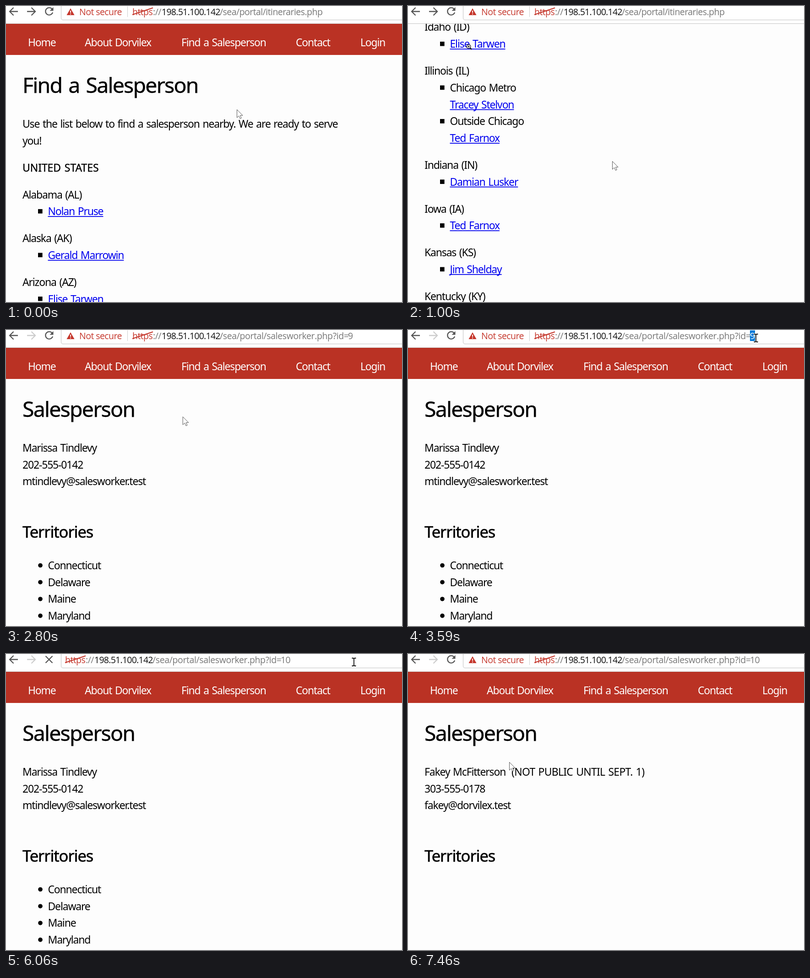
Recreate the animation shown at these times as an HTML page. Size 865 by 647 pixels, loop 8 s.

```html
<!DOCTYPE html>
<html lang="en">
<head>
<meta charset="utf-8">
<style>
html, body { margin: 0; width: 100%; height: 100%; overflow: hidden; background: #fdfdfd; }
svg { display: block; width: 865px; height: 647px; }
text { font: 22.9px "Noto Sans", "Open Sans", sans-serif; letter-spacing: -.049em; word-spacing: .08em; white-space: pre; }
.nav { fill: #fff; }
.link { fill: #00e; }
.note { letter-spacing: -.03em; }
.h1 { font-size: 46.4px; letter-spacing: -.038em; stroke: #000; stroke-width: .4px; }
.h2 { font-size: 34.4px; letter-spacing: -.03em; stroke: #000; stroke-width: .6px; }
.caps { letter-spacing: 0; stroke: #000; stroke-width: .4px; }
.bar text { font: 19.5px "Open Sans", "Noto Sans", sans-serif; letter-spacing: -.55px; word-spacing: 0; fill: #777; }
.bar .host { fill: #111; letter-spacing: -.75px; }
.bar .red { fill: #c5372c; }
.bar .sel { fill: #fff; }
.bar .wide { letter-spacing: -.38px; }
.icon { fill: none; stroke: #555; stroke-width: 2.3; }
</style>
</head>
<body>
<svg viewBox="0 0 865 647">
  <defs>
    <path id="ibeam" d="M755.5 9H758.5L760 10.5L761.5 9H764.5M760 10V25M755.5 26H758.5L760 24.5L761.5 26H764.5"/>
  </defs>
  <rect width="865" height="647" fill="#fdfdfd"/>
  <g id="list"></g>
  <g id="first"></g>
  <g id="second"></g>

  <g class="bar">
    <rect width="865" height="38" fill="#fff"/>
    <path d="M0 38.5H865" stroke="#c4c4c4"/>
    <path d="M120.5 -2V26q0 4.5 4.5 4.5H870" fill="#fff" stroke="#c2c2c2"/>
    <path class="icon" d="M26 12H8.5M16.5 3.5L8 12L16.5 20.5"/>
    <path class="icon" id="forward" d="M46 12H63.5M55.5 3.5L64 12L55.5 20.5"/>
    <g id="reload">
      <path class="icon" d="M100.5 6.5A8 8 0 1 0 102 14"/>
      <path d="M103.5 2.5V10.5H95.5Z" fill="#555"/>
    </g>
    <path class="icon" id="stop" d="M86.5 4.5L101.5 19.5M101.5 4.5L86.5 19.5"/>
    <g id="warning">
      <path d="M141 5L149.5 20H132.5Z" fill="#c5372c"/>
      <path d="M141 10V15M141 16.5V18.5" stroke="#fff" stroke-width="1.8"/>
      <text class="red" x="160" y="19.5">Not secure</text>
      <path d="M265.5 1V24" stroke="#ccc"/>
    </g>
    <g id="address">
      <text class="red" x="276" y="19.5">https</text>
      <text x="321" y="19.5">://</text>
      <path d="M276 19L321 4" stroke="#c5372c" stroke-width="2.2"/>
      <text class="host" x="340" y="19.5">198.51.100.142</text>
      <text id="path" x="467" y="19.5"></text>
      <rect id="mark" x="747" y="1" width="11" height="23" fill="#0078d7"/>
      <text id="digits" x="747" y="19.5"></text>
    </g>
  </g>

  <path id="arrow" d="M.5 .5V18L4.7 14.2L7.4 20.3L10.2 19L7.5 13.2H13Z" fill="#fff" stroke="#555"/>
  <g id="beam" fill="none">
    <use href="#ibeam" stroke="#fff" stroke-width="4"/>
    <use href="#ibeam" stroke="#111" stroke-width="1.8"/>
  </g>
  <g id="lens" stroke="#222" stroke-width="1.4">
    <path d="M3 3L6.5 6.5" stroke-width="2.5"/>
    <circle r="4.3" fill="#fff"/>
    <path d="M-2.3 0H2.3M0 -2.3V2.3"/>
  </g>
</svg>

<script>
const $ = id => document.getElementById(id);
const LINE = 36.72, GAP = 22.2, LOOP = 8000;

function add(parent, tag, attrs, text) {
  const el = document.createElementNS('http://www.w3.org/2000/svg', tag);
  for (const k in attrs) el.setAttribute(k, attrs[k]);
  if (text) el.textContent = text;
  return parent.appendChild(el);
}
const write = (g, x, y, text, cls = '') => add(g, 'text', { x, y, class: cls }, text);

function link(g, y, name) {
  const width = write(g, 91.5, y, name, 'link').getComputedTextLength();
  add(g, 'rect', { x: 91.5, y: y + 2, width, height: 1.8, fill: '#00e' });
}
const square = (g, y) => add(g, 'rect', { x: 70, y: y - 13.3, width: 9.6, height: 9.6 });

function header(g, title) {
  add(g, 'rect', { y: 39, width: 865, height: 68, fill: '#ba3224' });
  const items = { Home: 48, 'About Dorvilex': 172, 'Find a Salesperson': 383, Contact: 633, Login: 774 };
  for (const name in items) write(g, items[name], 88, name, 'nav');
  write(g, 36, 190, title, 'h1');
}

function person(g, lines, places) {
  header(g, 'Salesperson');
  lines.forEach((s, i) => write(g, 36, 266 + i * LINE, s));
  write(g, 36, 454, 'Territories', 'h2');
  places.forEach((s, i) => {
    const y = 523 + i * LINE;
    add(g, 'circle', { cx: 75, cy: y - 8.5, r: 4.8 });
    write(g, 91.5, y, s);
  });
}

// A bar in a row marks an area with its own salesperson.
const states = [
  ['Alabama (AL)', 'Nolan Pruse'],
  ['Alaska (AK)', 'Gerald Marrowin'],
  ['Arizona (AZ)', 'Elise Tarwen'],
  ['Arkansas (AR)', 'Nolan Pruse'],
  ['California (CA)', 'Northern California|Elise Tarwen', 'Southern California|Elise Tarwen'],
  ['Colorado (CO)', 'Elise Tarwen'],
  ['Connecticut (CT)', 'Marissa Tindlevy'],
  ['Delaware (DE)', 'Marissa Tindlevy'],
  ['Florida (FL)', 'Nolan Pruse'],
  ['Georgia (GA)', 'Nolan Pruse'],
  ['Hawaii (HI)', 'Elise Tarwen'],
  ['Idaho (ID)', 'Elise Tarwen'],
  ['Illinois (IL)', 'Chicago Metro|Tracey Stelvon', 'Outside Chicago|Ted Farnox'],
  ['Indiana (IN)', 'Damian Lusker'],
  ['Iowa (IA)', 'Ted Farnox'],
  ['Kansas (KS)', 'Jim Shelday'],
  ['Kentucky (KY)', 'Damian Lusker']
];

const list = $('list');
header(list, 'Find a Salesperson');
write(list, 36, 266, 'Use the list below to find a salesperson nearby. We are ready to serve');
write(list, 36, 303, 'you!');
write(list, 36, 361.5, 'UNITED STATES', 'caps');
let y = 420.5, idahoY;
for (const [state, ...rows] of states) {
  if (state.startsWith('Idaho')) idahoY = y;
  write(list, 36, y, state);
  y += LINE;
  for (const row of rows) {
    const [name, area] = row.split('|').reverse();
    square(list, y);
    if (area) {
      write(list, 91.5, y, area);
      y += LINE;
    }
    link(list, y, name);
    y += LINE;
  }
  y += GAP;
}
person($('first'), ['Marissa Tindlevy', '202-555-0142', 'mtindlevy@salesworker.test'],
  ['Connecticut', 'Delaware', 'Maine', 'Maryland']);
person($('second'), ['Fakey McFitterson', '303-555-0178', 'fakey@dorvilex.test'], []);
write($('second'), 226, 266, '(NOT PUBLIC UNTIL SEPT. 1)', 'note');

// Share of a move done in n even jumps, the first at a and the last at b.
function steps(t, a, b, n) {
  if (t < a) return 0;
  return Math.min(n, Math.floor((t - a) / (b - a) * (n - 1) + 1e-6) + 1) / n;
}

const moves = [
  [70, 1000, 8, 446, 339],
  [1900, 2250, 4, 236, 258],
  [2630, 3450, 7, 760, 17],
  [6900, 6990, 2, 785, 16],
  [7310, 7460, 2, 221, 236]
];
function pointer(t) {
  let px = 504, py = 226;
  for (const [a, b, n, x, y] of moves) {
    const p = steps(t, a, b, n);
    px += (x - px) * p;
    py += (y - py) * p;
  }
  return [px, py];
}

const show = (id, on) => $(id).style.display = on ? '' : 'none';
const place = (id, x, y) => $(id).setAttribute('transform', `translate(${x} ${y})`);

function draw(now) {
  const t = now % LOOP;
  const within = (a, b) => t >= a && t < b;
  const onList = t < 2630, entering = within(6060, 6440);
  const loading = within(2250, 2630) || entering;

  show('list', onList);
  show('first', within(2630, 6440));
  show('second', t >= 6440);
  const down = idahoY - 54.5;
  place('list', 0, -down * steps(t, 70, 1000, 8) + 555.6 * steps(t, 1460, 1900, 4));

  show('reload', !loading);
  show('stop', loading);
  show('warning', !entering);
  $('forward').style.stroke = onList ? '#555' : '#ccc';
  place('address', entering ? -147 : 0, 0);
  $('path').textContent = '/sea/portal/' + (onList ? 'itineraries.php' : 'salesworker.php?id=');
  $('path').setAttribute('class', onList ? '' : 'wide');
  const selected = within(3590, 5590);
  show('mark', selected);
  $('digits').textContent = onList ? '' : t < 5590 ? '9' : t < 5660 ? '1' : '10';
  $('digits').setAttribute('class', selected ? 'sel' : '');

  const typing = within(3450, 6900);
  show('arrow', !typing);
  show('beam', typing);
  place('arrow', ...pointer(t));

  show('lens', within(1000, 1460) || within(4520, 5510));
  const p = steps(t, 4520, 5510, 13);
  if (t < 4000) place('lens', 132.5, 88.5);
  else place('lens', 60 + 681 * p, 71 - 52 * p);
}

function frame() {
  draw(performance.now());
  requestAnimationFrame(frame);
}
frame();
</script>
</body>
</html>
```
